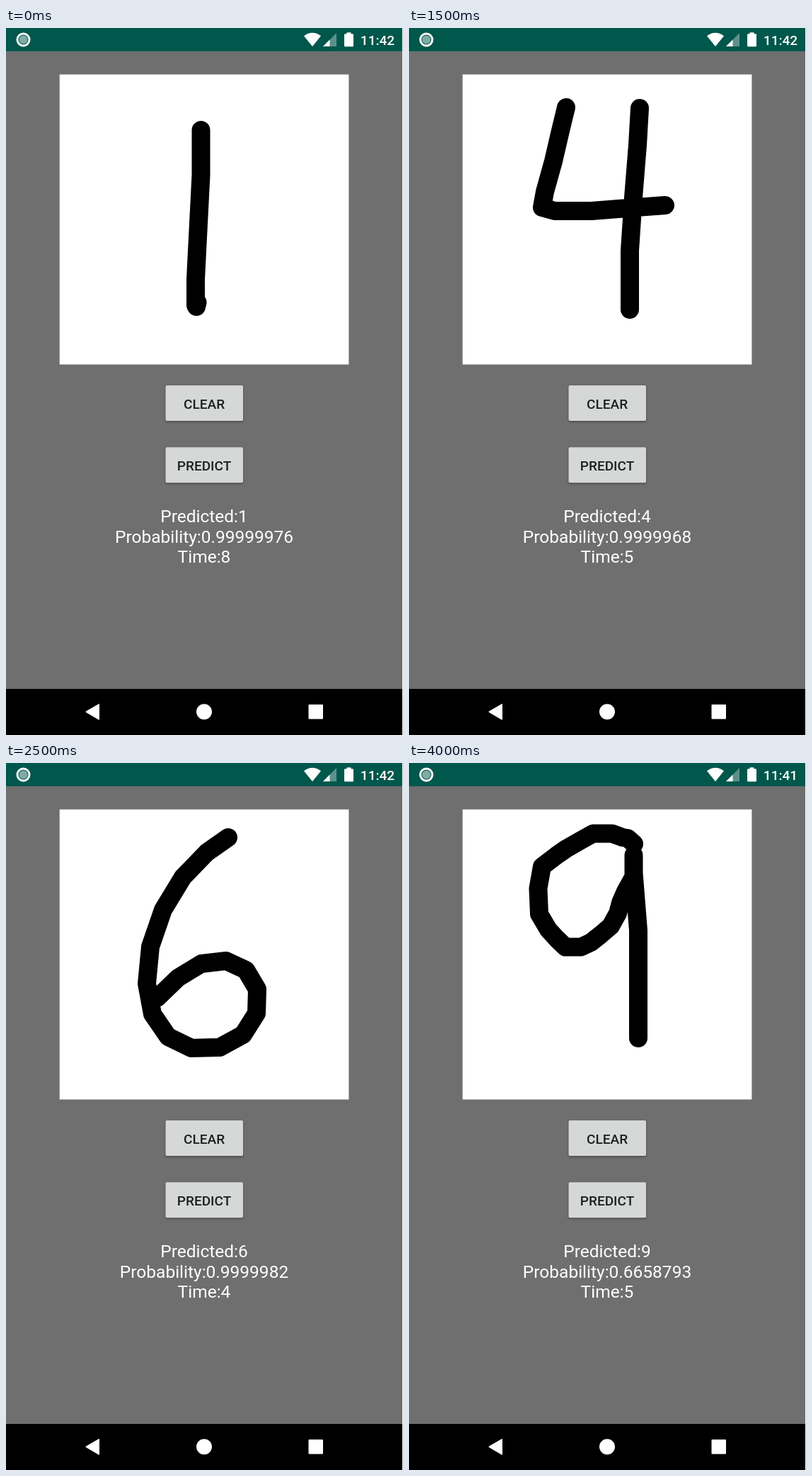
These frames come from a looping animation (561 px wide and 997 px high, 4500 ms). An HTML page with a canvas:

```html
<!DOCTYPE html>
<html lang="en">
<head>
<meta charset="utf-8">
<title>Digit recognition</title>
<style>
html, body { margin: 0; width: 100%; height: 100%; overflow: hidden; background: #fff; }
canvas { display: block; }
</style>
</head>
<body>
<canvas id="stage" width="561" height="997"></canvas>
<script>
const ctx = document.getElementById('stage').getContext('2d');
const STEP = 500;
const MID = 280;

// Each screen: pen strokes, predicted digit, probability, time, clock
const screens = [];
function screen(strokes, probability, time, clock = '11:42') {
  screens.push({ pen: new Path2D(strokes), digit: screens.length + 1, probability, time, clock });
}

screen('M275.5 144V207L268 354V391L269 393L270.5 387', '0.99999976', 8);

screen(`M188 152L196 131L212 115L235 106H268L291 117L305 137L307 164L297 196
  L277 230L248 268L214 310L184 347L171 367L178 378L205 384H270L330 380L359 377`, '0.9999999', 5);

screen(`M200 125L216 117L234 109.5L250 108.5H271L289 121L294 143L303 163L307.5 184V206
  L292 230L272 247L247 259L220 261L240 255H262L283 260L306 271L326 284L342 302L350 317
  L353 330V354L344 373L331 389L315 399L296 406L282 408.5H210L198 402L180 397L166 390
  L153 376L143 354`, '1.0', 5);

screen(`M222 112L214 145L204 188L192 231L188 253L206 258H258L321 253L362 250
  M326 113L323 165L317 239L312 314V397`, '0.9999968', 5);

screen(`M348 108L338 112.5H210L207 126V224H216L232 222L252 217H267L284 214H299L312 221
  L329 234L343 248L354 268L362.5 292V310L357 321L354 332L340 348L333 357L322 362
  L278 375L258 376.5H232L222 372L208 369`, '0.99999976', 4);

screen(`M314 105L284 126L250 161L222 207L204 259L199 311L207 354L229 386L262 402
  L302 401L335 383L354 353L355 319L339 292L311 279L276 283L243 303L214 331`, '0.9999982', 4);

screen(`M175 93L281 96.5L303 91L328 86.5L334 87L344 81H350V108L331 269L325.5 325V354H328`,
  '0.92017615', 3, '11:41');

screen(`M305 227L293 226L268 212L243 193L234 180L230 165V149L239 139L244 125L263 117
  L290 111.5H332L343 121L350 133L355 155L354 181L344 201L331 220L298 259L265 303
  L252 321L240 343L234.5 366V393L244 411L268 416.5H295L310 409L340 395L368 380L395 358
  L407 343L414 328V318L400 301L385 289L362 270L342 257L330 245Z`, '0.9999989', 7);

screen(`M318 114L309 106L302 105L287 99.5H260L243 109L222 121L209 130L188 146L182.5 177
  L184 213L197 235L209 248L221 259.5H243L257 253L271 242L285 230L295 212L299 197
  L306 181L316 163M317.5 130V155L324 236V388`, '0.6658793', 5, '11:41');

function rect(x, y, w, h, color, radius = 0) {
  ctx.fillStyle = color;
  ctx.beginPath();
  ctx.roundRect(x, y, w, h, radius);
  ctx.fill();
}

function disc(x, y, r, color) {
  ctx.fillStyle = color;
  ctx.beginPath();
  ctx.arc(x, y, r, 0, Math.PI * 2);
  ctx.fill();
}

function shape(path, color) {
  ctx.fillStyle = color;
  ctx.fill(new Path2D(path));
}

function text(str, x, y, size, color, weight = 400) {
  ctx.font = `${weight} ${size}px Roboto, sans-serif`;
  ctx.textAlign = 'center';
  ctx.fillStyle = color;
  ctx.fillText(str, x, y);
}

function button(label, y) {
  ctx.save();
  ctx.shadowColor = 'rgba(0,0,0,0.35)';
  ctx.shadowBlur = 3;
  ctx.shadowOffsetY = 1.5;
  rect(225.5, y, 109.5, 50, '#d6d7d7', 2);
  ctx.restore();
  text(label, MID, y + 32.7, 19.06, '#1e1f1f', 500);
}

function statusBar(clock) {
  rect(0, 0, 560, 32.7, '#00574b');
  disc(24.5, 16.5, 10, '#fff');
  disc(24.5, 16.5, 7, '#00574b');
  disc(24.5, 16.5, 6, '#80aba5');
  shape('M421 11.2Q433 2.4 445 11.2L433 26Z', '#fff');
  shape('M467 7V26H448Z', '#5c918a');
  shape('M457.5 16.5V26H448Z', '#fff');
  rect(481.5, 6.3, 6, 4, '#fff');
  rect(478, 8.3, 13, 18, '#fff', 1.3);
  text(clock, 525, 24, 19.06, '#fff', 500);
}

function navBar() {
  rect(0, 932, 560, 65, '#000');
  shape('M113 963.5Q112 964.3 113 965.1L130.8 975.4Q132 976 132 974.7V953.9Q132 952.6 130.8 953.2Z', '#fff');
  disc(MID, 964.3, 11, '#fff');
  rect(427.5, 954, 20.5, 20.5, '#fff', 1);
}

function draw({ pen, digit, probability, time, clock }) {
  rect(0, 0, 561, 997, '#fff');
  rect(0, 0, 560, 997, '#6f6f6f');
  statusBar(clock);
  rect(75.7, 65.5, 408.7, 409, '#fff');
  ctx.lineWidth = 26;
  ctx.lineCap = ctx.lineJoin = 'round';
  ctx.strokeStyle = '#000';
  ctx.stroke(pen);
  button('CLEAR', 504);
  button('PREDICT', 591.3);
  [`Predicted:${digit}`, `Probability:${probability}`, `Time:${time}`]
    .forEach((line, i) => text(line, MID, 697 + i * 28.6, 24.5, '#fff'));
  navBar();
}

const start = performance.now();
function tick() {
  const elapsed = performance.now() - start;
  draw(screens[Math.floor(elapsed / STEP) % screens.length]);
  requestAnimationFrame(tick);
}
tick();
</script>
</body>
</html>
```
